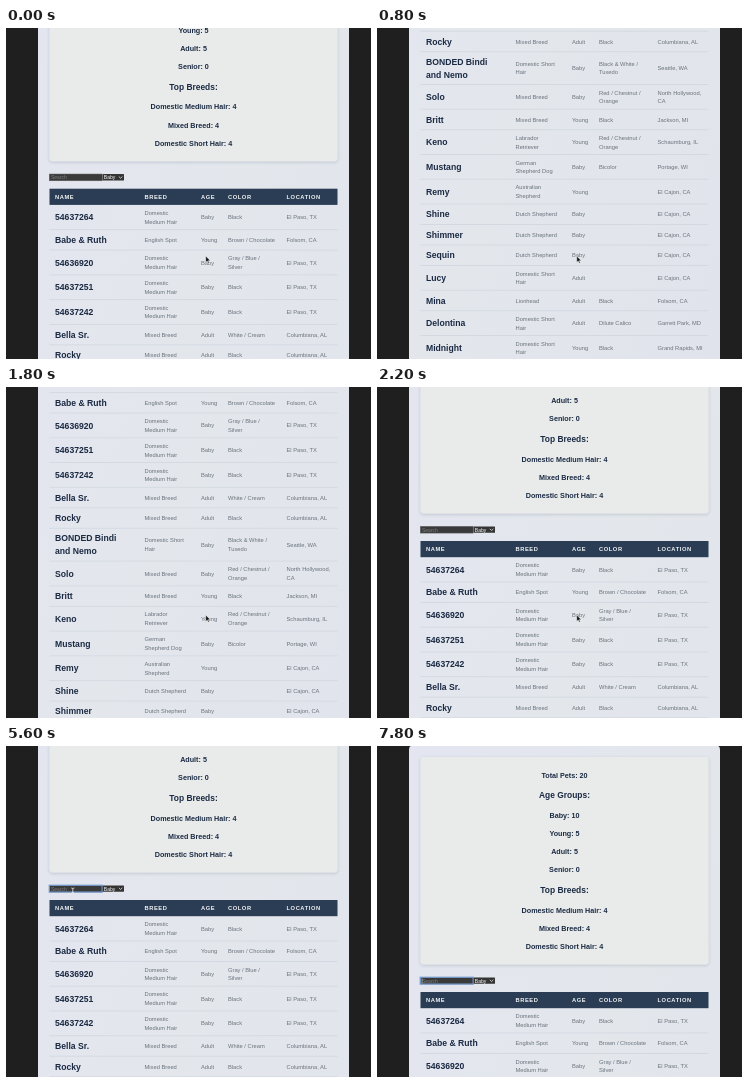
Write an HTML page that moves like this. It is 365 by 331 pixels and loops after 8 s.

```html
<!DOCTYPE html>
<html lang="en">
<head>
<meta charset="utf-8">
<title>Pet dashboard</title>
<style>
  html, body { margin: 0; width: 100%; height: 100%; overflow: hidden; background: #1f1f1f; }
  svg { display: block; }
  text { font-family: "Liberation Sans", Arial, sans-serif; }
</style>
</head>
<body>
<svg width="365" height="331" viewBox="0 0 365 331">
  <defs>
    <linearGradient id="cardFill" x1="0" y1="0" x2="1" y2="1">
      <stop offset="0" stop-color="#e3e5f0"/>
      <stop offset=".5" stop-color="#e3e7ec"/>
      <stop offset="1" stop-color="#e0e3ec"/>
    </linearGradient>
    <filter id="shadow" x="-5%" y="-5%" width="110%" height="110%">
      <feDropShadow dx="0" dy="1" stdDeviation="1.6" flood-color="#26344c" flood-opacity=".2"/>
    </filter>
  </defs>
  <g id="page">
    <rect id="card" x="32" y="-.5" width="311" rx="4" fill="url(#cardFill)"/>
    <rect x="43.5" y="11" width="288" height="207.5" rx="3" fill="#e8ebea" filter="url(#shadow)"/>
    <g id="stats"></g>
    <g id="controls"></g>
    <g id="table"></g>
  </g>
  <path id="arrow" d="M0 0V6.4L1.5 5.1 2.5 7.3 3.6 6.8 2.6 4.7H4.6Z" fill="#111" stroke="#fff" stroke-width=".5"/>
  <path id="beam" d="M-1.6 0Q0 0 0 1Q0 0 1.6 0M0 1V6M-1.6 7Q0 7 0 6Q0 7 1.6 7M-1 4.5H1" fill="none" stroke="#e6e6e6" stroke-width=".8"/>
</svg>
<script>
const LOOP = 8000, STEP = 200;
const NAVY = "#1b2a43", MUTED = "#69717b";
const TABLE_TOP = 246, HEAD_HEIGHT = 16.2;
const $ = id => document.getElementById(id);

// "|" marks a line break in the full table
const pets = `54637264;Domestic|Medium Hair;Baby;Black;El Paso, TX
Babe & Ruth;English Spot;Young;Brown / Chocolate;Folsom, CA
54636920;Domestic|Medium Hair;Baby;Gray / Blue /|Silver;El Paso, TX
54637251;Domestic|Medium Hair;Baby;Black;El Paso, TX
54637242;Domestic|Medium Hair;Baby;Black;El Paso, TX
Bella Sr.;Mixed Breed;Adult;White / Cream;Columbiana, AL
Rocky;Mixed Breed;Adult;Black;Columbiana, AL
BONDED Bindi|and Nemo;Domestic Short|Hair;Baby;Black & White /|Tuxedo;Seattle, WA
Solo;Mixed Breed;Baby;Red / Chestnut /|Orange;North Hollywood,|CA
Britt;Mixed Breed;Young;Black;Jackson, MI
Keno;Labrador|Retriever;Young;Red / Chestnut /|Orange;Schaumburg, IL
Mustang;German|Shepherd Dog;Baby;Bicolor;Portage, WI
Remy;Australian|Shepherd;Young;;El Cajon, CA
Shine;Dutch Shepherd;Baby;;El Cajon, CA
Shimmer;Dutch Shepherd;Baby;;El Cajon, CA
Sequin;Dutch Shepherd;Baby;;El Cajon, CA
Lucy;Domestic Short|Hair;Adult;;El Cajon, CA
Mina;Lionhead;Adult;Black;Folsom, CA
Delontina;Domestic Short|Hair;Adult;Dilute Calico;Garrett Park, MD
Midnight;Domestic Short|Hair;Young;Black;Grand Rapids, MI`.split("\n").map(row => row.split(";"));

// column starts for each search text
const columns = {
  "": [49, 138.5, 195, 222, 280.5],
  R: [49, 118.5, 185.5, 215.5, 279.5],
  Ro: [49, 104, 169.3, 207.3, 259]
};

const scrollTrack = [[0, 85.3], [800, 399], [1200, 448.7], [1400, 425], [1800, 281.4],
  [2200, 92], [5800, 92], [6000, 0]];
const pointerX = [[2400, 199.7], [3600, 69.8], [4000, 69.8], [4600, 66.8]];
const pointerY = [[2400, 228], [3600, 144.6], [4000, 144.6], [4600, 142]];

function valueAt(track, time, ease = p => p) {
  const next = track.findIndex(key => key[0] > time);
  if (next < 0) return track[track.length - 1][1];
  if (next === 0) return track[0][1];
  const [t0, a] = track[next - 1], [t1, b] = track[next];
  return a + (b - a) * ease((time - t0) / (t1 - t0));
}
const smooth = p => p * p * (3 - 2 * p);

// y is the middle of the capitals
function label(content, x, y, size, fill, extra = "") {
  const safe = content.replace(/&/g, "&amp;");
  return `<text x="${x}" y="${y + size * .36}" font-size="${size}" fill="${fill}" ${extra}>${safe}</text>`;
}

function drawStats() {
  const lines = [[29.3, "Total Pets: 20"], [49.3, "Age Groups:", 8.42], [69.8, "Baby: 10"],
    [87.8, "Young: 5"], [105.8, "Adult: 5"], [123.8, "Senior: 0"], [144, "Top Breeds:", 8.42],
    [164.2, "Domestic Medium Hair: 4"], [182.3, "Mixed Breed: 4"], [200.3, "Domestic Short Hair: 4"]];
  $("stats").innerHTML = lines.map(([y, content, size = 7.2]) =>
    label(content, 187.5, y, size, NAVY, 'font-weight="bold" text-anchor="middle"')).join("");
}

function drawControls(query, focused, caret) {
  const caretX = { "": 45, R: 48.7, Ro: 51.4 }[query];
  $("controls").innerHTML =
    `<rect x="43.3" y="231.3" width="52.9" height="6.8" fill="#3a3a3a" stroke="${focused ? "#7398c8" : "#666"}" stroke-width="${focused ? 1.3 : .5}"/>` +
    label(query || "Search", 45, 235, 5, query ? "#fff" : "#808080") +
    (caret ? `<path d="M${caretX} 232.4V237.4" stroke="#fff" stroke-width=".5"/>` : "") +
    `<rect x="96.6" y="231.4" width="21.4" height="6.4" rx=".6" fill="#343434"/>` +
    label("Baby", 97.8, 234.7, 5, "#fff") +
    `<path d="M112.8 233.8L114.6 235.5L116.4 233.8" fill="none" stroke="#fff" stroke-width=".7"/>`;
}

function drawTable(query) {
  const xs = columns[query];
  let y = TABLE_TOP + HEAD_HEIGHT;
  let out = `<rect x="43.5" y="${TABLE_TOP}" width="288" height="${HEAD_HEIGHT}" fill="#2b3d54"/>`;
  ["NAME", "BREED", "AGE", "COLOR", "LOCATION"].forEach((title, i) =>
    out += label(title, xs[i], TABLE_TOP + 8, 5.76, "#f3f5f7", 'font-weight="bold" letter-spacing=".576"'));

  for (const pet of pets) {
    if (!pet[0].toLowerCase().includes(query.toLowerCase())) continue;
    const cells = pet.map(cell => query ? [cell.replace("|", " ")] : cell.split("|"));
    const height = cells[0].length > 1 ? 32.8 : cells.some(lines => lines.length > 1) ? 24.75 : 20.5;
    cells.forEach((lines, i) => {
      const [size, gap, fill, weight] = i ? [5.76, 8.64, MUTED, "normal"] : [8.64, 12.96, NAVY, "bold"];
      lines.forEach((line, n) => out += label(line, xs[i],
        y + height / 2 + (n - (lines.length - 1) / 2) * gap, size, fill, `font-weight="${weight}"`));
    });
    y += height;
    out += `<path d="M43.5 ${y}H331.5" stroke="#cbd1da" stroke-width=".6"/>`;
  }
  $("table").innerHTML = out;
  $("card").setAttribute("height", y + 19);
}

function queryAt(time) {
  if (time >= 6000 && time < 7600) return "Ro";
  return time >= 5800 && time < 7800 ? "R" : "";
}

function render(time) {
  const query = queryAt(time);
  const focused = time >= 4600;
  const caret = time >= 5800 && !(time >= 6600 && time < 7000);
  const scroll = valueAt(scrollTrack, time);
  $("page").setAttribute("transform", `translate(0 ${-scroll})`);
  drawControls(query, focused, caret);
  drawTable(query);

  const overInput = time >= 4400, typing = time >= 5800;
  const place = `translate(${valueAt(pointerX, time, smooth)} ${valueAt(pointerY, time, smooth)})`;
  for (const [id, visible] of [["arrow", !overInput], ["beam", overInput && !typing]]) {
    $(id).setAttribute("transform", place);
    $(id).setAttribute("visibility", visible ? "visible" : "hidden");
  }
}

let shown = -1;
function tick() {
  const time = Math.floor(performance.now() % LOOP / STEP) * STEP;
  if (time !== shown) render(shown = time);
  requestAnimationFrame(tick);
}
drawStats();
tick();
</script>
</body>
</html>
```
